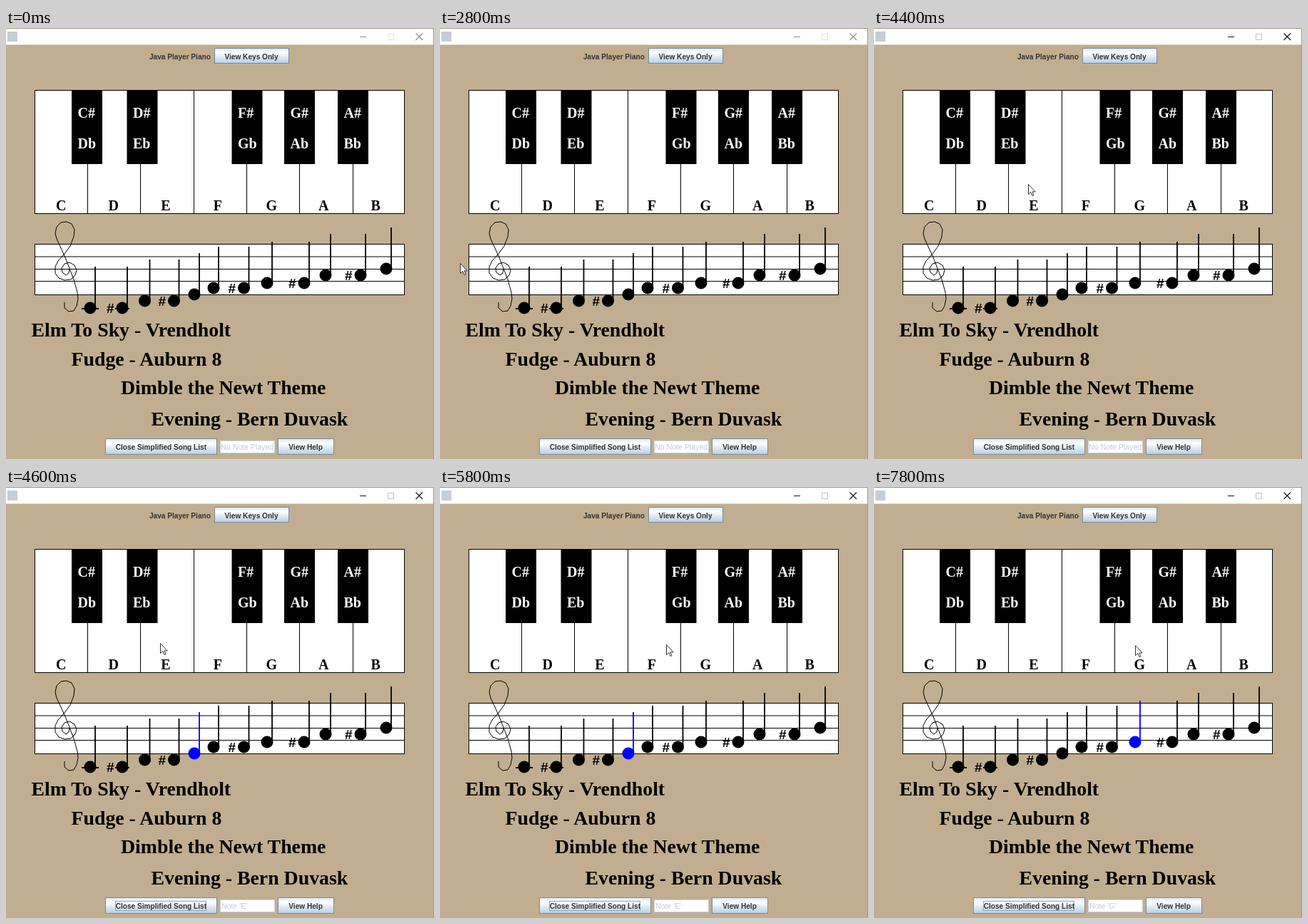
An HTML page that plays this animation: 600 by 605 pixels, repeating every 8000 ms.

```html
<!DOCTYPE html>
<html lang="en">
<head>
<meta charset="utf-8">
<title>Player Piano</title>
<style>
html, body { margin: 0; width: 100%; height: 100%; overflow: hidden; background: #c1ae90; }
svg { display: block; width: 600px; height: 605px; }
.line { fill: none; stroke: #000; }
.ui { font: bold 10.1px "Liberation Sans", Arial, sans-serif; fill: #333; }
.field { font: 10.6px "Liberation Sans", Arial, sans-serif; fill: #c3cbd6; }
.key { font: bold 20px "Liberation Serif", "Times New Roman", serif; }
.song { font: bold 27.8px "Liberation Serif", "Times New Roman", serif; }
.sharp { font: bold 19px "Liberation Sans", Arial, sans-serif; }
.note { color: #000; fill: currentColor; stroke: currentColor; }

/* Everything runs on one 8 s clock; one step is 200 ms = 2.5%. */
.anim { animation: 8s step-end infinite; }
#cursor { animation-name: cursor; }
#controls { animation-name: activate; }
#focus { animation-name: focus; }
.idle { animation-name: idle; }
.playE { animation-name: showE; }
.playF { animation-name: showF; }
.playG { animation-name: showG; }
.note.playE { animation-name: noteE; }
.note.playF { animation-name: noteF; }
.note.playG { animation-name: noteG; }

@keyframes cursor {
  0% { visibility: hidden; transform: translate(28px, 330px); }
  35% { visibility: visible; transform: translate(28px, 330px); animation-timing-function: steps(4); }
  45% { visibility: visible; transform: translate(216px, 219px); }
  65% { visibility: visible; transform: translate(216px, 219px); animation-timing-function: steps(3); }
  72.5% { visibility: visible; transform: translate(317px, 221px); }
  85% { visibility: visible; transform: translate(317px, 221px); animation-timing-function: steps(2); }
  90%, 100% { visibility: visible; transform: translate(366px, 222px); }
}
@keyframes activate { 0% { stroke: #8c8c8c; } 55%, 100% { stroke: #111; } }
@keyframes focus { 0% { visibility: hidden; } 57.5%, 100% { visibility: visible; } }
@keyframes idle { 0% { visibility: visible; } 57.5%, 100% { visibility: hidden; } }
@keyframes showE { 0% { visibility: hidden; } 57.5% { visibility: visible; } 75%, 100% { visibility: hidden; } }
@keyframes showF { 0% { visibility: hidden; } 75% { visibility: visible; } 92.5%, 100% { visibility: hidden; } }
@keyframes showG { 0% { visibility: hidden; } 92.5%, 100% { visibility: visible; } }
@keyframes noteE { 0% { color: #000; } 57.5% { color: #00f; } 75%, 100% { color: #000; } }
@keyframes noteF { 0% { color: #000; } 75% { color: #00f; } 92.5%, 100% { color: #000; } }
@keyframes noteG { 0% { color: #000; } 92.5%, 100% { color: #00f; } }
</style>
</head>
<body>
<svg viewBox="0 0 600 605">
  <defs>
    <linearGradient id="steel" x2="0" y2="1">
      <stop offset="0" stop-color="#dde8f3"/>
      <stop offset=".3" stop-color="#fff"/>
      <stop offset=".6" stop-color="#dde8f3"/>
      <stop offset="1" stop-color="#b8cfe5"/>
    </linearGradient>
  </defs>
  <rect width="600" height="605" fill="#c1ae90"/>

  <!-- title bar -->
  <rect width="600" height="23.5" fill="#fff"/>
  <path d="M0 .5H599.5V605" fill="none" stroke="#a3937a"/>
  <rect x="2" y="5" width="14" height="14" fill="#c5cdd6"/>
  <g id="controls" class="anim" fill="none">
    <path d="M496 12.5h9M574.5 7.5l9.5 9.5M584 7.5l-9.5 9.5" stroke-width="1.1"/>
    <path d="M535.5 8.5h8v8h-8z" stroke-opacity=".25"/>
  </g>

  <!-- toolbar and footer -->
  <g fill="url(#steel)" stroke="#7a8a99">
    <rect x="292.5" y="28.5" width="104" height="21"/>
    <rect x="139.5" y="576.5" width="156" height="22"/>
    <rect x="381.5" y="576.5" width="78" height="22"/>
  </g>
  <rect x="300.5" y="579.5" width="76" height="17" fill="#fff" stroke="#c8d2dc"/>
  <rect id="focus" class="anim" x="153.5" y="581.5" width="127" height="13" fill="none" stroke="#8fa7c4"/>
  <g class="ui">
    <text x="201" y="43.5">Java Player Piano</text>
    <text x="306.5" y="43.5">View Keys Only</text>
    <text x="153.7" y="592">Close Simplified Song List</text>
    <text x="396.3" y="592">View Help</text>
  </g>
  <g class="field">
    <text class="anim idle" x="301" y="592">No Note Played</text>
    <text class="anim playE" x="302" y="592">Note 'E'</text>
    <text class="anim playF" x="302" y="592">Note 'F'</text>
    <text class="anim playG" x="302" y="592">Note 'G'</text>
  </g>

  <g id="piano"></g>

  <!-- staff -->
  <rect x="40.5" y="303.5" width="518" height="71" fill="#fff" stroke="#000"/>
  <path class="line" d="M40 321h519M40 338.5h519M40 355.5h519"/>
  <path class="line" stroke-width="2" d="M106 394h24M153 394h20"/>
  <path class="line" d="M82 385L82 393 88 398 95 397 99 390 101 380 100 371 95 353 83 322 71 296 69 288 71 279 77 273 85 272 92 275 96 283 95 293 90 306 82 317 73 327 69 335 69 344 74 351 82 354 91 353 97 347 99 340 96 333 89 329 82 331 78 337 79 343 84 347 88 344 89 338"/>
  <g id="notes"></g>

  <g class="song">
    <text x="35.5" y="433">Elm To Sky - Vrendholt</text>
    <text x="91.5" y="474">Fudge - Auburn 8</text>
    <text x="161" y="513.5">Dimble the Newt Theme</text>
    <text x="203.5" y="557.5">Evening - Bern Duvask</text>
  </g>

  <path id="cursor" class="anim" d="M.5 .5V14.5L3.8 11.5 6 16.5 8 15.7 5.9 10.9H10.2Z" fill="#fff" stroke="#333"/>
</svg>
<script>
const NS = 'http://www.w3.org/2000/svg';
const $ = id => document.getElementById(id);

function add(parent, tag, attrs, text = '') {
  const node = document.createElementNS(NS, tag);
  for (const name in attrs) node.setAttribute(name, attrs[name]);
  node.textContent = text;
  return parent.appendChild(node);
}

// White keys
const piano = $('piano');
add(piano, 'rect', { x: 40.5, y: 87.5, width: 518, height: 173, fill: '#fff', stroke: '#000' });
[...'CDEFGAB'].forEach((name, i) => {
  if (i) add(piano, 'path', { class: 'line', d: `M${Math.floor(40.25 + 74.3 * i) + 0.5} 88V260` });
  add(piano, 'text', { class: 'key', x: 70 + 73.6 * i, y: 256 }, name);
});

// Black keys: left edge, sharp name, flat name
[[92, 'C#', 'Db'], [169.5, 'D#', 'Eb'], [316.5, 'F#', 'Gb'], [390, 'G#', 'Ab'], [465, 'A#', 'Bb']]
  .forEach(([x, sharp, flat]) => {
    add(piano, 'rect', { x, y: 87, width: 43, height: 104 });
    add(piano, 'text', { class: 'key', x: x + 8.5, y: 126, fill: '#fff' }, sharp);
    add(piano, 'text', { class: 'key', x: x + 8.5, y: 169, fill: '#fff' }, flat);
  });

// Notes: centre, optional sharp or played letter
[[118, 393], [163, 393, '#'], [194.5, 383], [235.5, 383, '#'], [264, 374, 'E'], [291, 365, 'F'],
 [333.5, 365, '#'], [366, 358, 'G'], [418, 358, '#'], [448, 347], [497, 347, '#'], [533, 338]]
  .forEach(([x, y, mark]) => {
    if (mark === '#') add($('notes'), 'text', { class: 'sharp', x: x - 22, y: y + 7 }, '#');
    const played = mark && mark !== '#' ? ` anim play${mark}` : '';
    const note = add($('notes'), 'g', { class: 'note' + played });
    add(note, 'circle', { cx: x, cy: y, r: 8.5, stroke: 'none' });
    add(note, 'path', { d: `M${x + 7} ${y}v-58`, 'stroke-width': 1.8 });
  });
</script>
</body>
</html>
```
